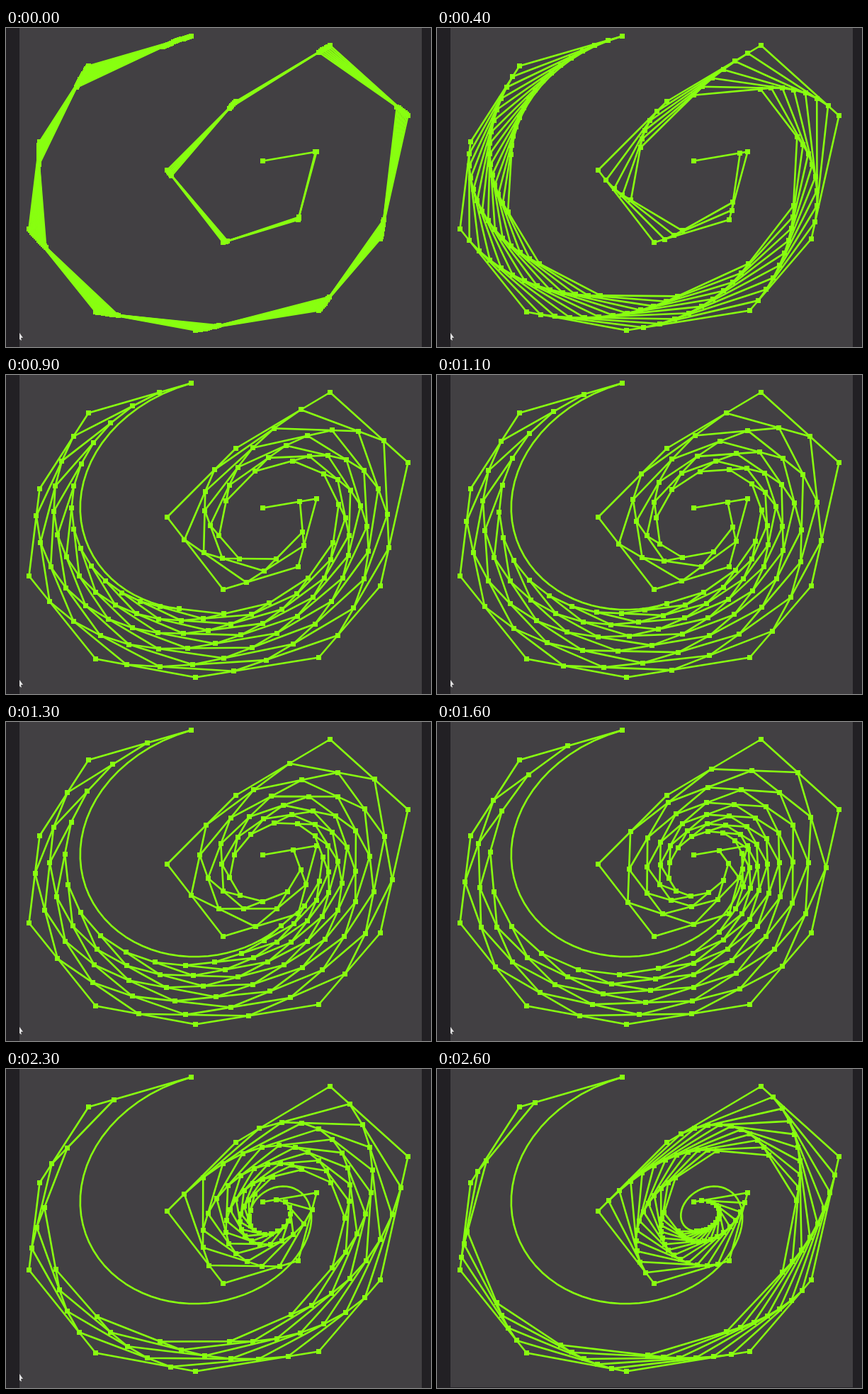
An HTML page with a canvas for the animation above (2.7 s loop, 600 by 450 pixels).

```html
<!DOCTYPE html>
<html lang="en">
<head>
<meta charset="utf-8">
<title>De Casteljau construction</title>
<style>
  html, body { margin: 0; height: 100%; overflow: hidden; background: #222024; }
  canvas { display: block; }
</style>
</head>
<body>
<canvas id="stage" width="600" height="450"></canvas>
<script>
const ctx = document.getElementById('stage').getContext('2d');
const LOOP = 2700, TICK = 100, CURSOR_GONE = 24;
const DARK = '#222024', GREY = '#424043', GREEN = '#88ff10';

// Control points of the Bézier spiral, from the outer end inwards.
const control = [
  [261, 11], [116, 53], [47, 160], [32, 283], [126, 400], [267, 426],
  [441, 398], [528, 297], [567, 123], [457, 24], [324, 103], [227, 200],
  [306, 302], [412, 270], [438, 174], [362, 187]
];

// Progress in whole percent: nearly constant speed with a slight wobble.
const percentAt = tick => Math.round(2 + 3.17 * tick - 0.25 * Math.sin(0.4 * tick));

const blend = (points, t) => points.slice(1).map(([x, y], i) => {
  const [px, py] = points[i];
  return [px + (x - px) * t, py + (y - py) * t];
});

function levels(t) {
  const rows = [control];
  while (rows.at(-1).length > 1) rows.push(blend(rows.at(-1), t));
  return rows;
}

const curvePoint = t => levels(t).at(-1)[0];

function polyline(points) {
  ctx.beginPath();
  points.forEach(([x, y]) => ctx.lineTo(x, y));
  ctx.stroke();
}

function fillBox(color, x, y, w, h) {
  ctx.fillStyle = color;
  ctx.fillRect(x, y, w, h);
}

function drawBackground(tick) {
  const late = tick >= CURSOR_GONE;
  fillBox(DARK, 0, 0, 600, 450);
  fillBox(GREY, 19, 0, 568, late ? 449 : 450);
  if (late) return;
  ctx.fillStyle = '#e0e0e0';
  ctx.fill(new Path2D('M19 430 l5 7 h-3 l1 4 l-3 -2 z'));
}

function drawConstruction(percent) {
  ctx.save();
  ctx.translate(0.5, 0.5);
  ctx.strokeStyle = GREEN;
  ctx.lineWidth = 2.6;
  ctx.lineJoin = 'round';
  polyline(Array.from({ length: percent + 1 }, (_, i) => curvePoint(i / 100)));
  for (const row of levels(percent / 100)) {
    polyline(row);
    for (const [x, y] of row) fillBox(GREEN, Math.round(x) - 3.5, Math.round(y) - 3.5, 7, 7);
  }
  ctx.restore();
}

function frame() {
  const tick = Math.floor(performance.now() % LOOP / TICK);
  drawBackground(tick);
  drawConstruction(percentAt(tick));
  requestAnimationFrame(frame);
}
frame();
</script>
</body>
</html>
```
